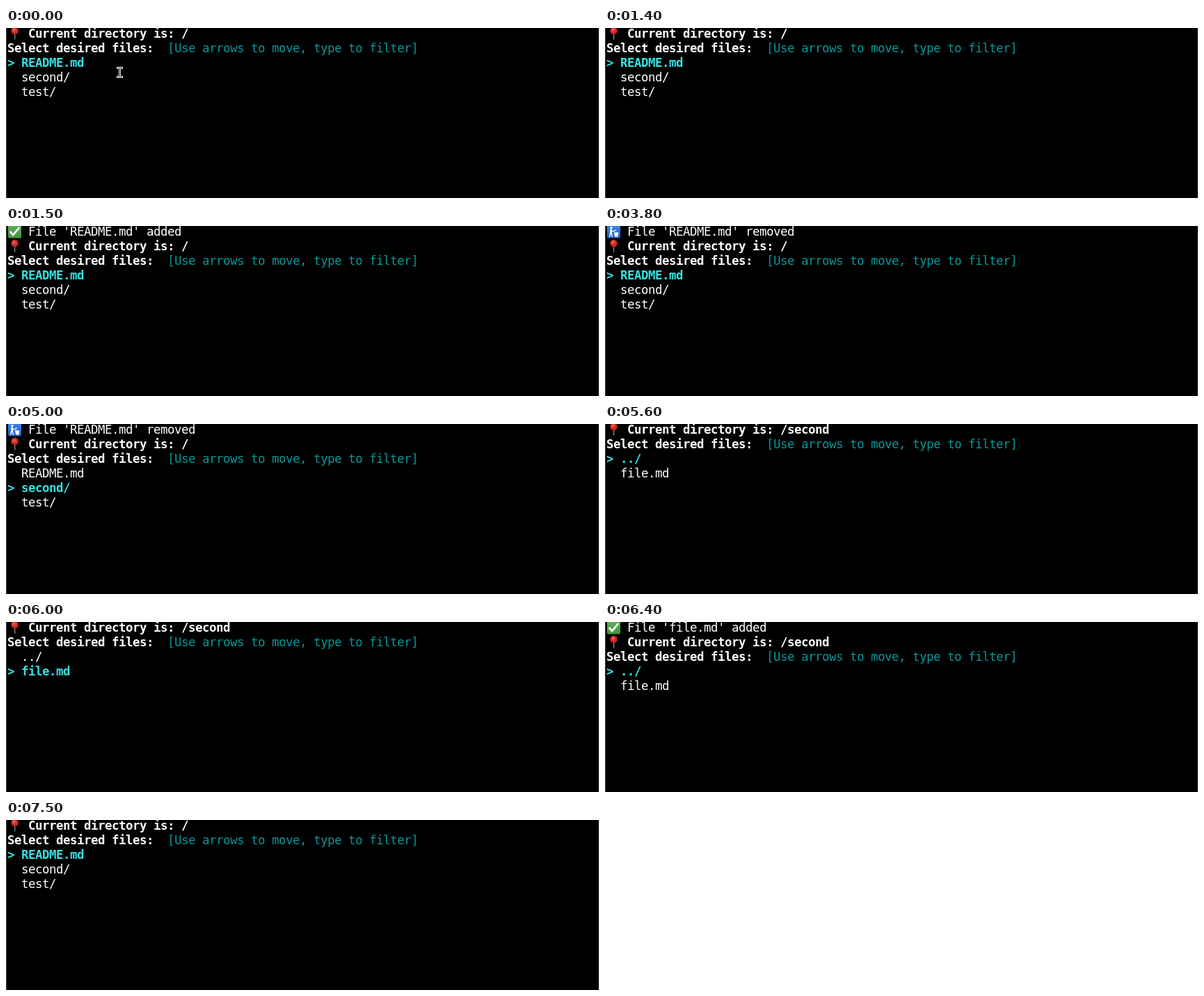
An HTML page with a canvas that plays this animation: 852x245 px, repeating every 8 s.

```html
<!DOCTYPE html>
<html lang="en">
<head>
<meta charset="utf-8">
<title>File picker</title>
<style>
  html, body { margin: 0; width: 100%; height: 100%; overflow: hidden; background: #000; }
  canvas { display: block; }
</style>
</head>
<body>
<canvas id="stage" width="852" height="245"></canvas>
<script>
const ctx = document.getElementById('stage').getContext('2d');
const LOOP = 8000, CELL = 10, ROW = 21, LEFT = 2, BASE = 14;
const FONT = '13pt "DejaVu Sans Mono", monospace';
const WHITE = '#ffffff', CYAN = '#34e2e2', TEAL = '#06989a';

const root = { dir: '/', files: ['README.md', 'second/', 'test/'] };
const second = { dir: '/second', files: ['../', 'file.md'] };
const removed = { icon: bin, text: "File 'README.md' removed" };

const states = [
  { at: 0, ...root, pick: 0, pointer: true },
  { at: 1400, ...root, pick: 0 },
  { at: 1500, ...root, pick: 0, note: { icon: check, text: "File 'README.md' added" } },
  { at: 3800, ...root, pick: 0, note: removed },
  { at: 5000, ...root, pick: 1, note: removed },
  { at: 5600, ...second, pick: 0 },
  { at: 6000, ...second, pick: 1 },
  { at: 6400, ...second, pick: 0, note: { icon: check, text: "File 'file.md' added" } },
  { at: 7500, ...root, pick: 0 }
];

// The terminal snaps each character to a whole-pixel cell.
ctx.font = FONT;
ctx.letterSpacing = CELL - ctx.measureText('0'.repeat(100)).width / 100 + 'px';

function print(text, col, row, color, bold) {
  ctx.font = (bold ? 'bold ' : '') + FONT;
  ctx.fillStyle = color;
  ctx.fillText(text, LEFT + col * CELL, BASE + row * ROW);
}

function line(points, color, width) {
  ctx.beginPath();
  points.forEach(([x, y]) => ctx.lineTo(x, y));
  ctx.strokeStyle = color;
  ctx.lineWidth = width;
  ctx.stroke();
}

function disc(x, y, r, color) {
  ctx.beginPath();
  ctx.arc(x, y, r, 0, Math.PI * 2);
  ctx.fillStyle = color;
  ctx.fill();
}

function tile(top, bottom) {
  const g = ctx.createLinearGradient(0, -1, 0, 17);
  g.addColorStop(0, top);
  g.addColorStop(1, bottom);
  ctx.beginPath();
  ctx.roundRect(3, -1.5, 19, 19, 2);
  ctx.fillStyle = g;
  ctx.fill();
}

function check() {
  tile('#5fae55', '#43963f');
  ctx.lineCap = ctx.lineJoin = 'round';
  line([[6.5, 8.8], [10.3, 13], [18.3, 3]], WHITE, 2.8);
}

function bin() {
  tile('#3f86e8', '#1c5fc4');
  ctx.lineCap = ctx.lineJoin = 'round';
  disc(9, 2.6, 1.7, WHITE);
  line([[8.6, 6], [8.6, 10.3]], WHITE, 2.8);
  line([[8.2, 10], [6.6, 15]], WHITE, 1.5);
  line([[9, 10], [10.4, 15]], WHITE, 1.5);
  line([[9, 6], [12, 8], [14.3, 6.4]], WHITE, 1.3);
  disc(15.7, 6.3, 0.8, WHITE);
  ctx.beginPath();
  [[13, 9.2], [19.4, 9.2], [18.4, 15.6], [14, 15.6]].forEach(([x, y]) => ctx.lineTo(x, y));
  ctx.fillStyle = WHITE;
  ctx.fill();
}

function pin(y) {
  ctx.save();
  ctx.translate(0, y);
  ctx.lineCap = 'round';
  line([[12.6, 7], [12.6, 16]], '#78888f', 1.5);
  const g = ctx.createRadialGradient(11, 2, 0.5, 12.6, 4, 5.6);
  g.addColorStop(0, '#f0685f');
  g.addColorStop(0.45, '#d9332b');
  g.addColorStop(1, '#a51e1a');
  disc(12.6, 4, 5.4, g);
  ctx.restore();
}

function pointer() {
  ctx.lineCap = 'square';
  ctx.lineJoin = 'miter';
  for (const [color, width] of [[WHITE, 3], ['#000', 1]]) {
    line([[160.5, 57.5], [162.5, 57.5], [163.5, 58.5], [164.5, 57.5], [166.5, 57.5]], color, width);
    line([[160.5, 70.5], [162.5, 70.5], [163.5, 69.5], [164.5, 70.5], [166.5, 70.5]], color, width);
    line([[163.5, 58.5], [163.5, 69.5]], color, width);
  }
}

function draw(s) {
  ctx.fillStyle = '#000';
  ctx.fillRect(0, 0, 852, 245);
  ctx.fillStyle = '#454540';
  ctx.fillRect(0, 0, 1, 245);
  ctx.fillRect(851, 0, 1, 245);

  let row = 0;
  if (s.note) {
    s.note.icon();
    print(s.note.text, 3, row++, WHITE);
  }
  pin(row * ROW);
  print('Current directory is: ' + s.dir, 3, row++, WHITE, true);
  print('Select desired files:', 0, row, WHITE, true);
  print('[Use arrows to move, type to filter]', 23, row++, TEAL);
  s.files.forEach((name, i) => {
    const on = i === s.pick;
    print((on ? '> ' : '  ') + name, 0, row++, on ? CYAN : WHITE, on);
  });
  if (s.pointer) pointer();
}

const start = performance.now();
function tick() {
  const t = (performance.now() - start) % LOOP;
  draw(states.findLast(s => s.at <= t));
  requestAnimationFrame(tick);
}
tick();
</script>
</body>
</html>
```
